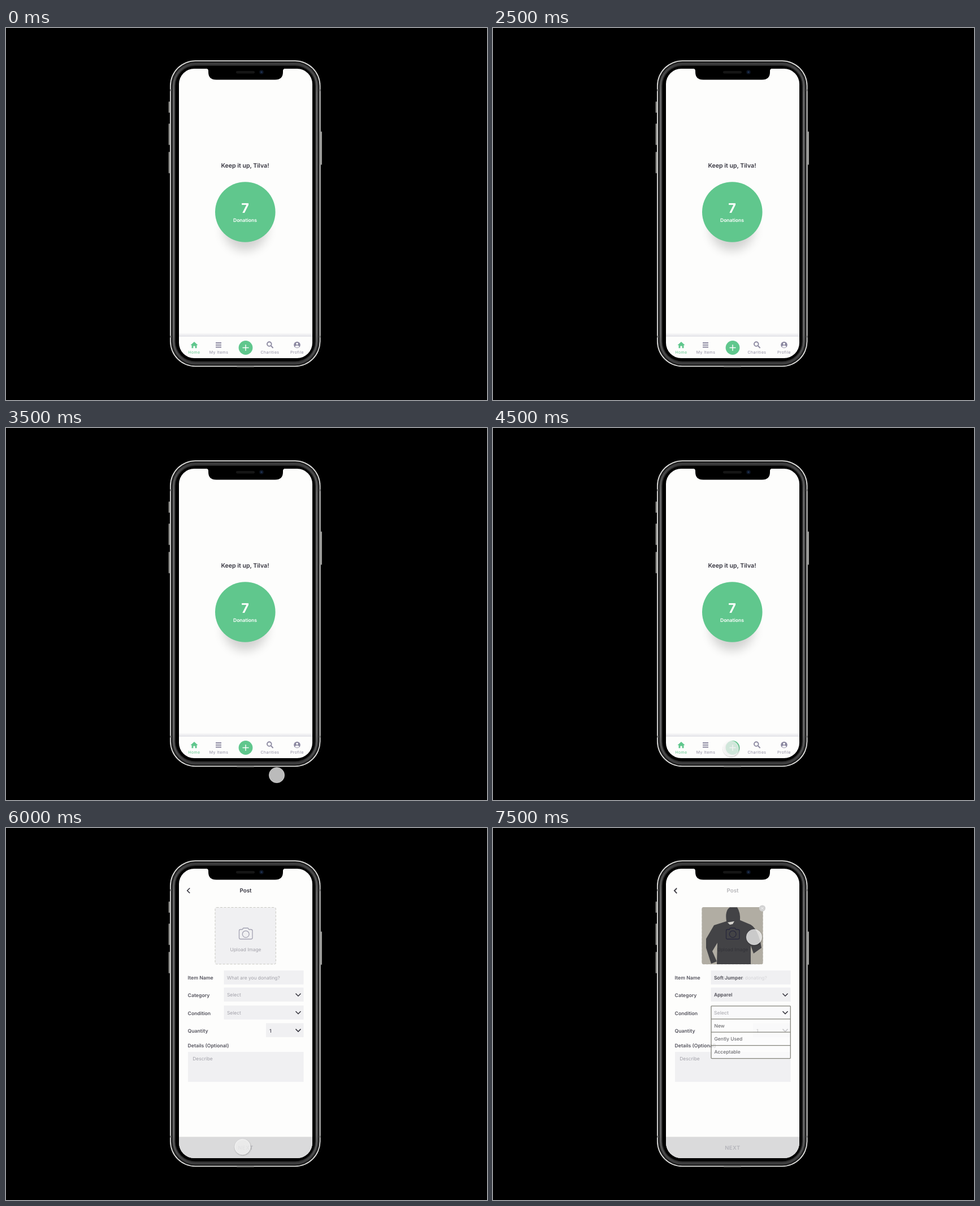
Animation, 851 px wide and 658 px high, one loop 8000 ms. Source, as an HTML page:

```html
<!DOCTYPE html>
<html lang="en">
<head>
<meta charset="utf-8">
<title>Donation app</title>
<style>
  html, body { margin: 0; width: 100%; height: 100%; overflow: hidden; background: #000; }
  svg { display: block; width: 851px; height: 658px; }
  text { font-family: Inter, "Open Sans", sans-serif; text-rendering: geometricPrecision; }
  .mid { text-anchor: middle; }
  .nav text { font-size: 7px; letter-spacing: .4px; fill: #8f8ca0; text-anchor: middle; }
  .label { font-size: 8.7px; font-weight: 600; fill: #53525c; }
  .hint { font-size: 8.4px; fill: #a2a1a9; }
  .value { font-size: 8.6px; font-weight: 600; fill: #55545c; }
  .option { font-size: 8.5px; font-weight: 500; fill: #6d6d70; }
  .field { fill: #f0f0f2; }
  .line { fill: none; stroke: #33323b; stroke-width: 1.5; }
</style>
</head>
<body>
<svg viewBox="0 0 851 658">
  <defs>
    <clipPath id="glass"><rect x="306" y="72" width="236" height="512" rx="27"/></clipPath>
    <filter id="blur" x="-50%" y="-50%" width="200%" height="200%"><feGaussianBlur stdDeviation="9"/></filter>
    <filter id="lift" x="-50%" y="-50%" width="200%" height="200%"><feDropShadow dx=".5" dy="1" stdDeviation="1.3" flood-color="#000" flood-opacity=".4"/></filter>
    <linearGradient id="edge" x2="0" y2="1">
      <stop offset="0" stop-color="#e2e2e7" stop-opacity="0"/>
      <stop offset="1" stop-color="#e2e2e7"/>
    </linearGradient>
    <linearGradient id="steel" x2="0" y2="1">
      <stop offset="0" stop-color="#3c3c3d"/>
      <stop offset=".1" stop-color="#767676"/>
      <stop offset=".9" stop-color="#767676"/>
      <stop offset="1" stop-color="#3c3c3d"/>
    </linearGradient>
    <path id="chevron" d="M-4.5-2.2 0 2.3 4.5-2.2"/>
    <g id="camera" fill="none" stroke-width="1.3">
      <path d="M414.5 179.5H418L420 177H428L430 179.5H433.5Q436 179.5 436 182V194Q436 196.5 433.5 196.5H415Q412.5 196.5 412.5 194V182Q412.5 179.5 414.5 179.5Z"/>
      <circle cx="424.2" cy="187.7" r="5.9"/>
    </g>
  </defs>

  <g id="body"></g>

  <g clip-path="url(#glass)">
    <rect x="306" y="72" width="236" height="512" fill="#fdfdfc"/>

    <g id="home">
      <text class="mid" x="423" y="246.5" font-size="10.6" font-weight="600" fill="#33323d">Keep it up, Tilva!</text>
      <circle cx="423.3" cy="355" r="39" opacity=".17" filter="url(#blur)"/>
      <circle cx="423.3" cy="325.5" r="53.3" fill="#60c78d"/>
      <g class="mid" fill="#fff">
        <text x="423" y="327" font-size="23.5" font-weight="700">7</text>
        <text x="423" y="342.5" font-size="8.6" font-weight="600">Donations</text>
      </g>
      <rect x="306" y="539" width="236" height="7" fill="url(#edge)"/>
      <g class="nav" fill="#8b88a0">
        <path fill="#60c78d" d="M326.5 561 333 555 339.5 561H337.5V566.3H334.6V562.5H331.4V566.3H328.5V561Z"/>
        <path d="M371 556h10v2h-10zM371 559.7h10v2h-10zM371 563.4h10v2h-10z"/>
        <circle cx="424" cy="565.5" r="12.4" fill="#60c78d"/>
        <path d="M418.5 565.5h11M424 560v11" stroke="#fff" stroke-width="1.4"/>
        <g fill="none" stroke="#8b88a0" stroke-width="1.9">
          <circle cx="465.8" cy="559" r="3.8"/><path d="M468.5 561.8 472.6 566"/>
        </g>
        <circle cx="515" cy="560.5" r="5.8"/>
        <circle cx="515" cy="558.6" r="1.8" fill="#fdfdfd"/>
        <ellipse cx="515" cy="563.4" rx="3.4" ry="1.8" fill="#fdfdfd"/>
        <text x="333" y="575.5" style="fill:#60c78d">Home</text>
        <text x="376.5" y="575.5">My Items</text>
        <text x="467" y="575.5">Charities</text>
        <text x="515" y="575.5">Profile</text>
      </g>
    </g>

    <g id="post">
      <path class="line" d="M325.2 106.3 320.7 110.7 325.2 115.1"/>
      <text id="heading" class="mid" x="424" y="114.3" font-size="9.8" font-weight="600" fill="#33323d">Post</text>
      <rect x="370" y="140.5" width="107.3" height="100.3" rx="2.5" fill="#f0f0f2" stroke="#c9c9c3" stroke-dasharray="4 2.5"/>
      <use href="#camera" stroke="#a3a2b2"/>
      <text class="hint mid" x="424" y="217.5">Upload Image</text>

      <g class="field">
        <rect x="385.5" y="252" width="141" height="24.7"/>
        <rect x="385.5" y="282.3" width="141" height="24.7"/>
        <rect x="385.5" y="314" width="141" height="24.7"/>
        <rect x="460" y="345.3" width="66.5" height="24.7"/>
        <rect x="322" y="396" width="204.5" height="53"/>
      </g>
      <g class="label">
        <text x="321.5" y="267.6">Item Name</text>
        <text x="321.5" y="299">Category</text>
        <text x="321.5" y="330.5">Condition</text>
        <text x="321.5" y="361.8">Quantity</text>
        <text x="321.5" y="388.4">Details (Optional)</text>
        <text x="466" y="361.5">1</text>
      </g>
      <g class="hint">
        <g id="blank">
          <text x="391" y="268">What are you donating?</text>
          <text x="391" y="298.2">Select</text>
        </g>
        <text x="391" y="329.6">Select</text>
        <text x="330.3" y="410.5">Describe</text>
      </g>
      <g class="line">
        <use href="#chevron" x="517" y="295"/>
        <use href="#chevron" x="517" y="326.5"/>
        <use href="#chevron" x="517" y="357.8"/>
      </g>
      <rect x="306" y="546.3" width="236" height="38" fill="#dadadb"/>
      <text class="mid" x="424" y="569.2" font-size="9.5" font-weight="600" letter-spacing=".5" fill="#b4b4ba">NEXT</text>
    </g>

    <g id="filled">
      <path class="line" opacity=".45" d="M325.2 107.5 321.7 111.9 325.2 116.3"/>
      <rect x="369.5" y="140" width="108" height="101" rx="3" fill="#b1ada3"/>
      <path fill="#434346" d="M413 165Q410 146 419 140.3H432Q438 150 437 163L456 171Q470 180 475 212L461 222 456 208V241H396L397 203 388 218 396 236 386 240 377 212V196L391 172Z"/>
      <path fill="#d5d3cd" d="M415 167 427 165 424 170 419 171Z"/>
      <use href="#camera" stroke="#28283c"/>
      <text class="hint mid" x="424" y="217.5" style="fill:#26262e" opacity=".6">Upload Image</text>
      <circle cx="476.5" cy="142" r="5.6" fill="#d2d2d2"/>
      <path d="M474.5 140l4 4m0-4-4 4" stroke="#f4f4f4"/>
      <g class="value">
        <text x="391" y="268">Soft Jumper</text>
        <text x="391" y="298.2">Apparel</text>
      </g>
      <rect x="386" y="314.8" width="140.3" height="92.8" rx="1" fill="#fdfdfd" fill-opacity=".75" stroke="#85857c" stroke-width="1.3"/>
      <path d="M386 337.8h140M386 361.2h140M386 384.6h140" stroke="#85857c" stroke-width="1.3"/>
      <text class="value" x="391" y="329.6" style="fill:#bcbcc0">Select</text>
      <use href="#chevron" class="line" x="517" y="326.5"/>
      <g class="option">
        <text x="391.5" y="353">New</text>
        <text x="391.5" y="376.3">Gently Used</text>
        <text x="391.5" y="399.3">Acceptable</text>
      </g>
    </g>
  </g>

  <path d="M354 71.5Q358 72 358 76V78Q358 91.5 372 91.5H476Q490 91.5 490 78V76Q490 72 494 71.5Z"/>
  <rect x="407" y="76" width="33" height="4.5" rx="2.2" fill="#161616"/>
  <circle cx="452" cy="78" r="3.8" fill="#0d1422"/>
  <circle cx="452" cy="78" r="1.6" fill="#213557"/>

  <g id="touch" filter="url(#lift)">
    <circle r="13.6" fill="#fbfbfb" fill-opacity=".7" stroke="#fff" stroke-opacity=".6" stroke-width=".9"/>
  </g>
</svg>
<script>
  const STEP = 500, LOOP = 8000;
  const $ = id => document.getElementById(id);
  const rect = (x, y, w, h, r, fill) =>
    `<rect x="${x}" y="${y}" width="${w}" height="${h}" rx="${r}" fill="${fill}"/>`;

  // Phone: side buttons, then nested shells from the bright rim inwards
  const buttons = [[287.7, 130, 20], [287.7, 169, 38], [287.7, 219, 38], [557, 183, 59]]
    .map(([x, y, h]) => rect(x, y, 2, h, 1, '#a3a3a0'));
  const shells = [[0, '#dededc'], [1.8, '#1b1b1b'], [4, '#3c3c3d'], [5.8, 'url(#steel)'], [7.8, '#2b2b2b'], [9.8, '#000']]
    .map(([d, fill]) => rect(290 + d, 57.3 + d, 266.5 - 2 * d, 542 - 2 * d, 45 - d, fill));
  const bands = [110, 546].flatMap(y => [290, 554].map(x => rect(x, y - 1.5, 2.5, 3, 0, '#777')));
  $('body').innerHTML = [...buttons, ...shells, ...bands, rect(408, 598.6, 31, 1.6, .8, '#5c5c5a')].join('');

  // Touch point stops: [time, x, y]
  const stops = [
    [3000, 703, 650], [3500, 479, 614], [4000, 433, 576], [4500, 421, 567],
    [5000, 418, 565], [6000, 418.5, 564], [6500, 447, 300], [7000, 462, 193]
  ];

  const show = (id, on) => $(id).setAttribute('visibility', on ? 'visible' : 'hidden');

  function draw(now) {
    const t = Math.floor(now % LOOP / STEP) * STEP;
    const filled = t >= 7500;
    show('home', t < 6000);
    show('post', t >= 6000);
    show('filled', filled);
    $('heading').setAttribute('opacity', filled ? .35 : 1);
    $('blank').setAttribute('opacity', filled ? .35 : 1);

    const stop = stops.filter(s => s[0] <= t).pop();
    show('touch', stop);
    if (stop) $('touch').setAttribute('transform', `translate(${stop[1]} ${stop[2]})`);
    requestAnimationFrame(draw);
  }
  draw(performance.now());
</script>
</body>
</html>
```
